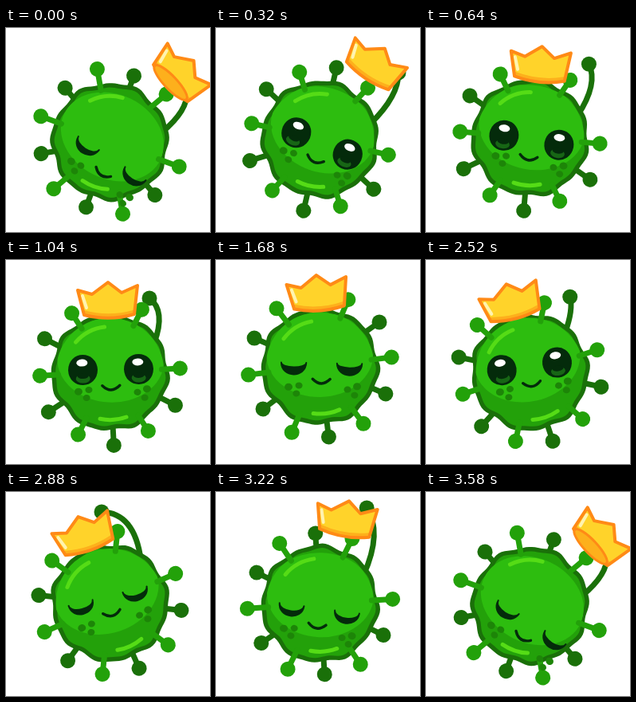
An HTML page with a canvas that plays this animation: 256 by 256 pixels, repeating every 3600 ms.

```html
<!DOCTYPE html>
<html lang="en">
<head>
<meta charset="utf-8">
<title>Crowned germ</title>
<style>
html, body { margin: 0; width: 100%; height: 100%; overflow: hidden; background: #fff; }
canvas { display: block; width: 100vw; height: 100vh; }
</style>
</head>
<body>
<canvas id="stage" width="256" height="256"></canvas>
<script>
const ctx = document.getElementById('stage').getContext('2d');
const LOOP = 3600, TAU = Math.PI * 2, RAD = Math.PI / 180;
const C = {
  rim: '#1a7009', mid: '#23a10a', bright: '#2dbd0f', shine: '#55dc16',
  freckle: '#1d8508', ink: '#042b0b', iris: '#176615',
  gold: '#ffd32a', amber: '#fdb01c', orange: '#ff8a16', pale: '#fff3b0'
};

// time, body turn, face turn, face x, face y, height offset, light spike reach
const bodyKeys = [
  [0, 26, 33, 131, 167, .4, 92.3],
  [320, 19, 23, 133, 145, -1.6, 88],
  [1040, 3, -1, 131.5, 137.5, -.5, 88],
  [1680, -1, 1, 132.5, 133, -3, 90.5],
  [2180, -5, -1, 131.5, 133, 0, 88],
  [2880, -18, -14, 128.5, 134.5, -3, 90]
];
// time, x, y, turn, visible opening
const crownKeys = [
  [0, 220, 55, 48, 1], [320, 200, 43, 34.5, 0], [560, 158, 42, 13, 0],
  [760, 129, 48, 1, 0], [1040, 128, 49, 0, 0], [1680, 127, 40, -3, 0],
  [2180, 118, 50, -8, 0], [2880, 97, 51, -18, 0], [3080, 118, 33, -10, 0],
  [3240, 170, 32, 14, 0], [3360, 214, 46, 43, .8], [3580, 220, 55, 48, 1]
];
// time, x, y of the arm's tip
const armKeys = [
  [0, 227, 79], [320, 229, 56], [560, 214, 45], [800, 186, 46], [1040, 180, 48],
  [1350, 204, 74], [1680, 205, 78], [2180, 202, 77], [2550, 178, 44],
  [2880, 120, 25], [3080, 134, 12], [3240, 196, 22], [3360, 228, 60], [3580, 227, 79]
];
const eyeKeys = [
  [0, 0], [110, 0], [250, 1], [1440, 1], [1580, .1], [1720, .1],
  [1900, 1], [2560, 1], [2720, 0], [3500, 0]
];

// Cyclic, overshoot-free Hermite interpolation.
function sample(keys, t) {
  const n = keys.length;
  const at = i => {
    const turn = Math.floor(i / n), k = keys[i - turn * n];
    return [k[0] + turn * LOOP, ...k.slice(1)];
  };
  let i = n - 1;
  while (i > 0 && keys[i][0] > t) i--;
  const [a, b, c, d] = [at(i - 1), at(i), at(i + 1), at(i + 2)];
  const h = c[0] - b[0], u = (t - b[0]) / h;
  const slope = (p, q, j) => (q[j] - p[j]) / (q[0] - p[0]);
  const tangent = (p, q) => p * q <= 0 ? 0 : 2 * p * q / (p + q);
  return b.slice(1).map((v, k) => {
    const j = k + 1, s = slope(b, c, j);
    const m0 = tangent(slope(a, b, j), s) * h, m1 = tangent(s, slope(c, d, j)) * h;
    const u2 = u * u, u3 = u2 * u;
    return v * (2 * u3 - 3 * u2 + 1) + m0 * (u3 - 2 * u2 + u)
      + c[j] * (3 * u2 - 2 * u3) + m1 * (u3 - u2);
  });
}

function ellipse(x, y, rx, ry, color, turn = 0) {
  ctx.beginPath();
  ctx.ellipse(x, y, rx, ry, turn, 0, TAU);
  ctx.fillStyle = color;
  ctx.fill();
}

function stroke(color, width) {
  ctx.strokeStyle = color;
  ctx.lineWidth = width;
  ctx.stroke();
}

function placed(x, y, degrees, draw) {
  ctx.save();
  ctx.translate(x, y);
  ctx.rotate(degrees * RAD);
  draw();
  ctx.restore();
}

function spike(degrees, reach, color) {
  const a = degrees * RAD, x = Math.cos(a), y = Math.sin(a);
  ctx.beginPath();
  ctx.moveTo(x * 65, y * 65);
  ctx.lineTo(x * reach, y * reach);
  stroke(color, 7);
  ellipse(x * reach, y * reach, 9.5, 9.5, color);
}

function arm(cx, cy, degrees, tip) {
  const base = degrees * RAD;
  const tipAngle = Math.atan2(tip[1] - cy, tip[0] - cx);
  const tipReach = Math.hypot(tip[0] - cx, tip[1] - cy);
  const bend = (base + tipAngle) / 2;
  const reach = (tipReach + 66) / 2 + .65 * Math.abs(base - tipAngle) / RAD;
  ctx.beginPath();
  ctx.moveTo(cx + Math.cos(base) * 66, cy + Math.sin(base) * 66);
  ctx.quadraticCurveTo(cx + Math.cos(bend) * reach, cy + Math.sin(bend) * reach, ...tip);
  stroke(C.rim, 7);
  ellipse(...tip, 9.5, 9.5, C.rim);
}

function blob(radius, color) {
  ctx.beginPath();
  for (let i = 0; i <= 120; i++) {
    const a = i / 120 * TAU;
    const r = radius + 1.5 * Math.sin(7 * a + .5) + 1.2 * Math.sin(12 * a + 1);
    ctx.lineTo(Math.cos(a) * r, Math.sin(a) * r);
  }
  ctx.fillStyle = color;
  ctx.fill();
}

function body(shift) {
  blob(73.5, C.rim);
  blob(68, C.mid);
  ctx.save();
  ctx.beginPath();
  ctx.arc(0, 0, 68, 0, TAU);
  ctx.clip();
  ellipse(0, -14 + shift, 67, 53, C.bright);
  ctx.restore();
  for (const [angle, radius, spread] of [[-121, 57, 21], [83, 60, 16]]) {
    ctx.beginPath();
    ctx.arc(0, 0, radius, (angle - spread) * RAD, (angle + spread) * RAD);
    stroke(C.shine, 5);
  }
}

function eye(x, open) {
  const mix = (shut, wide) => shut + (wide - shut) * open;
  const side = mix(15.5, 17.5), level = mix(-4, 0);
  const top = mix(7, -24), bottom = mix(15, 24);
  ctx.save();
  ctx.translate(x, 0);
  ctx.beginPath();
  ctx.moveTo(-side, level);
  ctx.bezierCurveTo(-side * .95, top, side * .95, top, side, level);
  ctx.bezierCurveTo(side * .95, bottom, -side * .95, bottom, -side, level);
  ctx.closePath();
  ctx.fillStyle = C.ink;
  ctx.fill();
  stroke(C.ink, 2);
  if (open > .3) {
    ctx.clip();
    ellipse(0, 11, 9, 5.5, C.iris);
    ellipse(0, 7.5, 7, 3.5, C.ink);
    ellipse(-1, -9, 7, 4.5 * open, '#fff');
  }
  ctx.restore();
}

function face(open) {
  const freckles = [[-41, 27, 5], [-28, 25, 4.5], [-31, 35, 4.5],
    [33, 29, 4.5], [45, 25, 5], [42, 36, 4.5]];
  for (const [x, y, r] of freckles) ellipse(x, y, r, r * .9, C.freckle);
  eye(-35, open);
  eye(35, open);
  const y = 16 + 4 * open;
  ctx.beginPath();
  ctx.moveTo(-11, y);
  ctx.quadraticCurveTo(0, y + 11, 11, y);
  stroke(C.ink, 3.4);
}

function crown(opening) {
  const outline = [[-38, -11], [-20, -6], [0, -21], [17, -8], [37, -17], [33, 19]];
  ctx.beginPath();
  outline.forEach(p => ctx.lineTo(...p));
  ctx.quadraticCurveTo(2, 28, -30, 20);
  ctx.closePath();
  ctx.fillStyle = C.gold;
  ctx.fill();
  ctx.save();
  ctx.clip();
  ctx.beginPath();
  ctx.moveTo(-30, 18);
  ctx.quadraticCurveTo(2, 26, 33, 17);
  stroke(C.amber, 7);
  ctx.beginPath();
  ctx.moveTo(-32, -4);
  ctx.lineTo(-27, 11);
  stroke(C.pale, 4);
  ctx.restore();
  ctx.beginPath();
  outline.forEach(p => ctx.lineTo(...p));
  ctx.quadraticCurveTo(2, 28, -30, 20);
  ctx.closePath();
  stroke(C.orange, 4);
  if (opening > .02) {
    ellipse(1, 19, 29, 8 * opening, C.amber, -.02);
    stroke(C.orange, 3);
  }
}

function draw(t) {
  const [turn, faceTurn, faceX, faceY, lift, reach] = sample(bodyKeys, t);
  const [crownX, crownY, crownTurn, opening] = sample(crownKeys, t);
  const [open] = sample(eyeKeys, t);
  const cx = 130.5, cy = 138 + 4 * Math.cos(t / 360 * TAU) + lift;

  ctx.fillStyle = '#fff';
  ctx.fillRect(0, 0, 256, 256);
  ctx.lineCap = ctx.lineJoin = 'round';

  arm(cx, cy, turn - 36, sample(armKeys, t));
  placed(cx, cy, turn, () => {
    for (let i = 1; i < 6; i++) spike(-36 + i * 60, 180 - reach, C.rim);
    body((faceY - cy) * .3);
    for (let i = 0; i < 6; i++) spike(-66 + i * 60, reach, C.mid);
  });
  placed(faceX, faceY, faceTurn, () => face(open));
  placed(crownX, crownY, crownTurn, () => crown(opening));
}

function tick() {
  draw(performance.now() % LOOP);
  requestAnimationFrame(tick);
}
tick();
</script>
</body>
</html>
```
